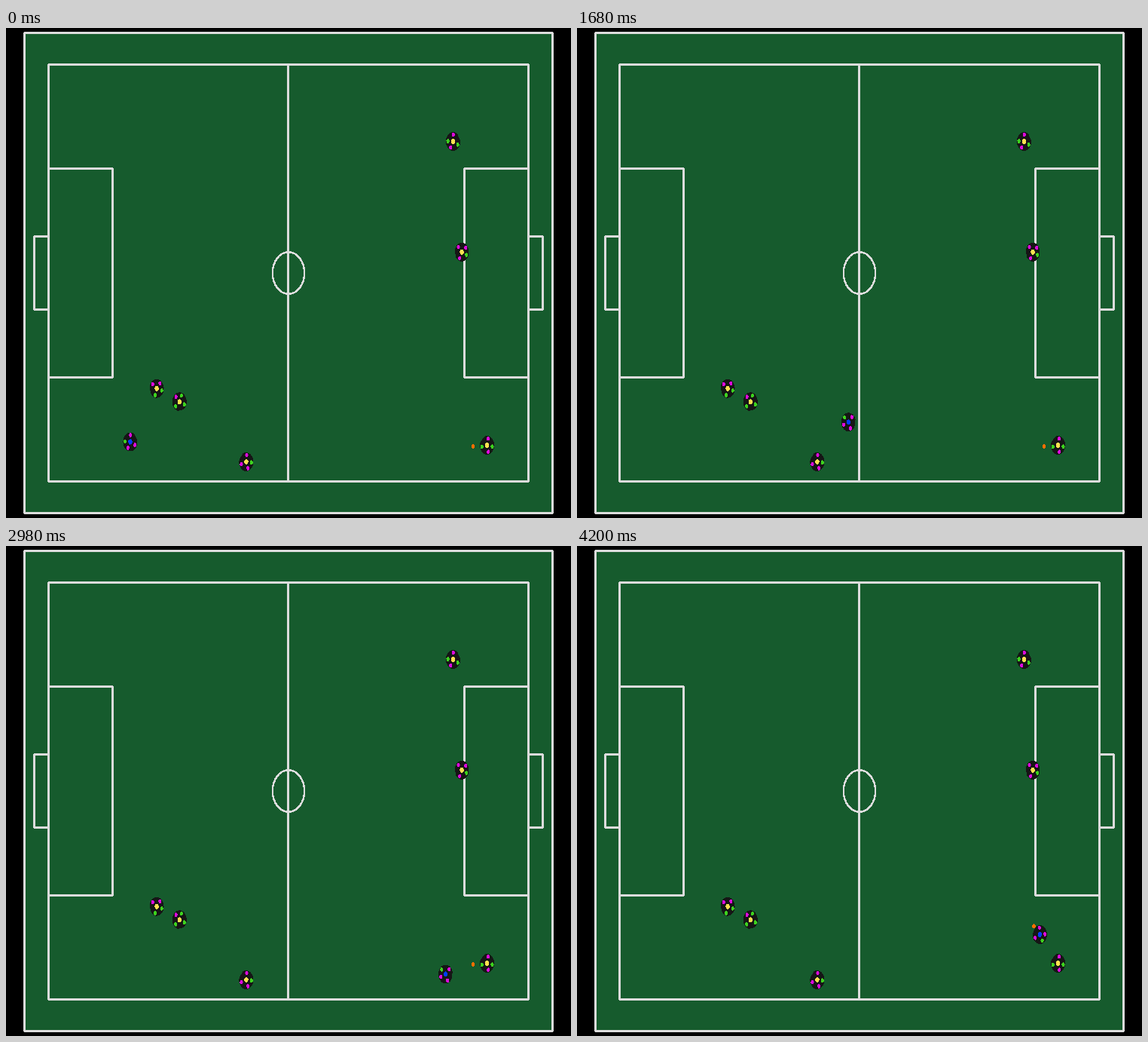
These frames come from a looping animation (750x650 px, 4.25 s). An HTML page:

```html
<!DOCTYPE html>
<html lang="en">
<head>
<meta charset="utf-8">
<title>Robot soccer run</title>
<style>
  html, body { margin: 0; width: 100%; height: 100%; overflow: hidden; background: #000; }
  svg { display: block; shape-rendering: crispEdges; }
  .lines { fill: none; stroke: #dcdcdc; stroke-width: 3; stroke-linejoin: bevel; }
</style>
</head>
<body>
<svg id="stage" width="750" height="650" viewBox="0 0 750 650">
  <rect x="24.5" y="6.5" width="701" height="637" fill="#165b2d"/>
  <g class="lines">
    <rect x="24.5" y="6.5" width="701" height="637"/>
    <rect x="56.5" y="48.5" width="637" height="553"/>
    <path d="M374.5 48.5V601.5"/>
    <path d="M56.5 186.5H141.5V463.5H56.5M693.5 186.5H608.5V463.5H693.5"/>
    <path d="M56.5 276.5H37.5V373.5H56.5M693.5 276.5H712.5V373.5H693.5"/>
    <ellipse cx="375" cy="325" rx="21.2" ry="27.7" stroke-width="2.6"/>
  </g>
</svg>
<script>
const stage = document.getElementById('stage');
const LOOP = 4250, STEP = 20, END = 4200;
// Pixels per metre, with pieces drawn 1.5 times their real size
const SX = 106.2, SY = 138.3;
const COLORS = { M: '#dc0adc', G: '#3cd21e', Y: '#ffe150', B: '#003cff' };
// Marker angles: front left, front right, back left, back right
const MARKS = [57.4, -57.4, 147.4, -147.4];
const polar = (r, deg) => {
  const a = deg * Math.PI / 180;
  return [r * Math.cos(a), -r * Math.sin(a)];
};

function add(parent, tag, attrs) {
  const node = document.createElementNS('http://www.w3.org/2000/svg', tag);
  for (const key in attrs) node.setAttribute(key, attrs[key]);
  return parent.appendChild(node);
}

function disc(parent, [cx, cy], r, fill) {
  add(parent, 'circle', { cx, cy, r, fill });
}

function place(node, x, y, angle = 0) {
  node.setAttribute('transform', `translate(${x} ${y}) scale(${SX} ${SY}) rotate(${-angle})`);
}

function robot(team, marks, x, y, angle) {
  const g = add(stage, 'g', {});
  const d = `M${polar(0.09, 24)}A.09 .09 0 1 0 ${polar(0.09, -24)}Z`;
  add(g, 'path', { d, fill: '#161616' });
  disc(g, [0, 0], 0.025, COLORS[team]);
  MARKS.forEach((a, i) => disc(g, polar(0.065, a), 0.02, COLORS[marks[i]]));
  place(g, x, y, angle);
  return g;
}

const ball = add(stage, 'g', {});
disc(ball, [0, 0], 0.0215, '#ff6e00');
const runner = robot('B', 'MMGM', 0, 0, 0);
robot('Y', 'MGGM', 593.5, 150.5, 30);
robot('Y', 'MMGM', 605, 297.3, 188);
robot('Y', 'GMGM', 200, 478.3, 197);
robot('Y', 'GGGM', 230.3, 495.8, -80);
robot('Y', 'MMMG', 318.9, 575.5, 142);
robot('Y', 'GMMG', 638.6, 553.5, 136);

// Waypoints of the run: time, x, y
const route = [
  [0, 165, 549],
  [540, 207.6, 559.3],
  [680, 227, 557.3],
  [1320, 317, 530],
  [1620, 352.8, 524.5],
  [2040, 408, 509.5],
  [2250, 440.8, 505.6],
  [2600, 501, 518],
  [3240, 624.6, 596.5],
  [3400, 633.5, 600.3],
  [3780, 632.8, 578.5],
  [4200, 614.3, 515.5]
];

const secant = (i, k) =>
  (route[i + 1][k] - route[i][k]) / (route[i + 1][0] - route[i][0]);

function slope(i, k) {
  if (i === 0) return 0;
  if (i === route.length - 1) return secant(i - 1, k);
  const a = secant(i - 1, k), b = secant(i, k);
  return a * b > 0 ? 2 * a * b / (a + b) : 0;
}

// Monotone cubic through the waypoints
function sample(t, k) {
  let i = 0;
  while (i < route.length - 2 && t >= route[i + 1][0]) i++;
  const p = route[i], q = route[i + 1], h = q[0] - p[0];
  const u = (t - p[0]) / h, v = 1 - u, s = u * u * (3 - 2 * u);
  return p[k] * (1 - s) + q[k] * s
    + h * u * v * (v * slope(i, k) - u * slope(i + 1, k));
}

const progress = (t, from, to) => Math.min(1, Math.max(0, (t - from) / (to - from)));

// Two clockwise turns: toward the run, then round behind the ball
function heading(t) {
  const u = progress(t, 700, 1060);
  return 30 - 40 * u * u * (3 - 2 * u) - 199 * progress(t, 3000, END) ** 1.3;
}

function draw(now) {
  const t = Math.min(END, Math.floor((now % LOOP) / STEP) * STEP);
  place(runner, sample(t, 1), sample(t, 2), heading(t));
  const roll = progress(t, 3910, END);
  place(ball, 620 - 13.6 * roll, 555 - 50.6 * roll);
}

let start;
function tick(now) {
  start ??= now;
  draw(now - start);
  requestAnimationFrame(tick);
}
draw(0);
requestAnimationFrame(tick);
</script>
</body>
</html>
```
